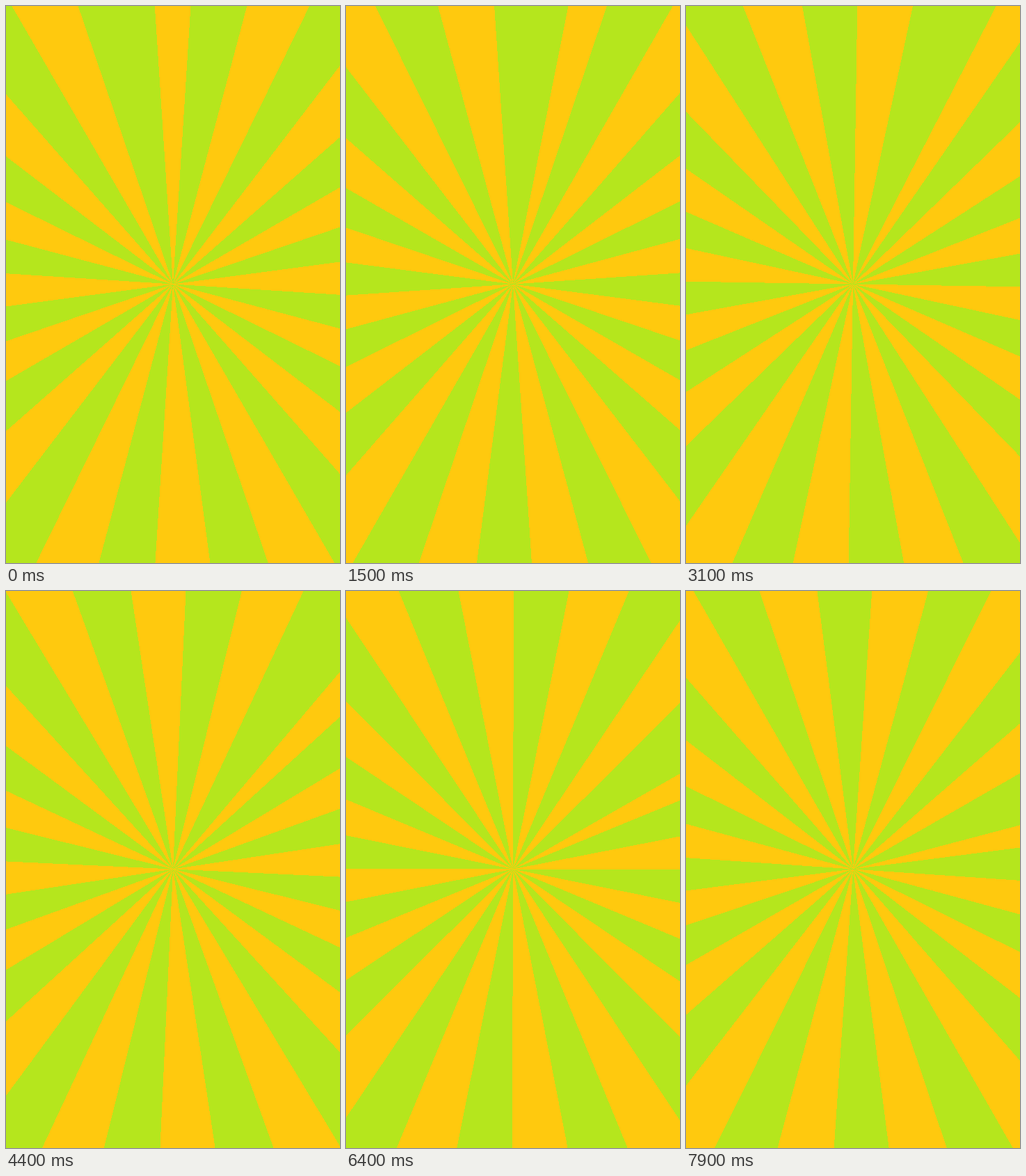
These frames come from a looping animation (480x800 px, 8000 ms). An HTML page:

```html
<!DOCTYPE html>
<html lang="en">
<head>
<meta charset="utf-8">
<title>Sunburst</title>
<style>
  html, body { margin: 0; width: 100%; height: 100%; overflow: hidden; background: #b5e61d; }
  svg { display: block; width: 100%; height: 100%; }
</style>
</head>
<body>
<svg viewBox="0 0 480 800" shape-rendering="crispEdges">
  <rect width="480" height="800" fill="#b5e61d"/>
  <path id="rays" fill="#ffc90e"/>
</svg>
<script>
const CENTER = { x: 240, y: 399.5 };
const RADIUS = 700;
const RAY_COUNT = 16;
const PITCH = 360 / RAY_COUNT;
const FIRST_EDGE = 3.65;
const NARROW_WIDTH = 7.4;
const STEP_MS = 100;
const STEP_COUNT = 80;

const rays = document.getElementById('rays');

// Degrees run clockwise from straight up.
function rimPoint(degrees) {
  const a = degrees * Math.PI / 180;
  const x = CENTER.x + RADIUS * Math.sin(a);
  const y = CENTER.y - RADIUS * Math.cos(a);
  return `${x.toFixed(2)} ${y.toFixed(2)}`;
}

function ray(end, width) {
  return `M${CENTER.x} ${CENTER.y}L${rimPoint(end - width)}L${rimPoint(end)}Z`;
}

function render(time) {
  // The burst turns one degree per step.
  const turn = Math.floor(time / STEP_MS) % STEP_COUNT;
  let d = '';
  for (let i = 0; i < RAY_COUNT; i++) {
    const width = i === 0 ? NARROW_WIDTH : PITCH / 2;
    d += ray(FIRST_EDGE + turn + i * PITCH, width);
  }
  rays.setAttribute('d', d);
}

const start = performance.now();
function tick() {
  render(performance.now() - start);
  requestAnimationFrame(tick);
}
tick();
</script>
</body>
</html>
```
